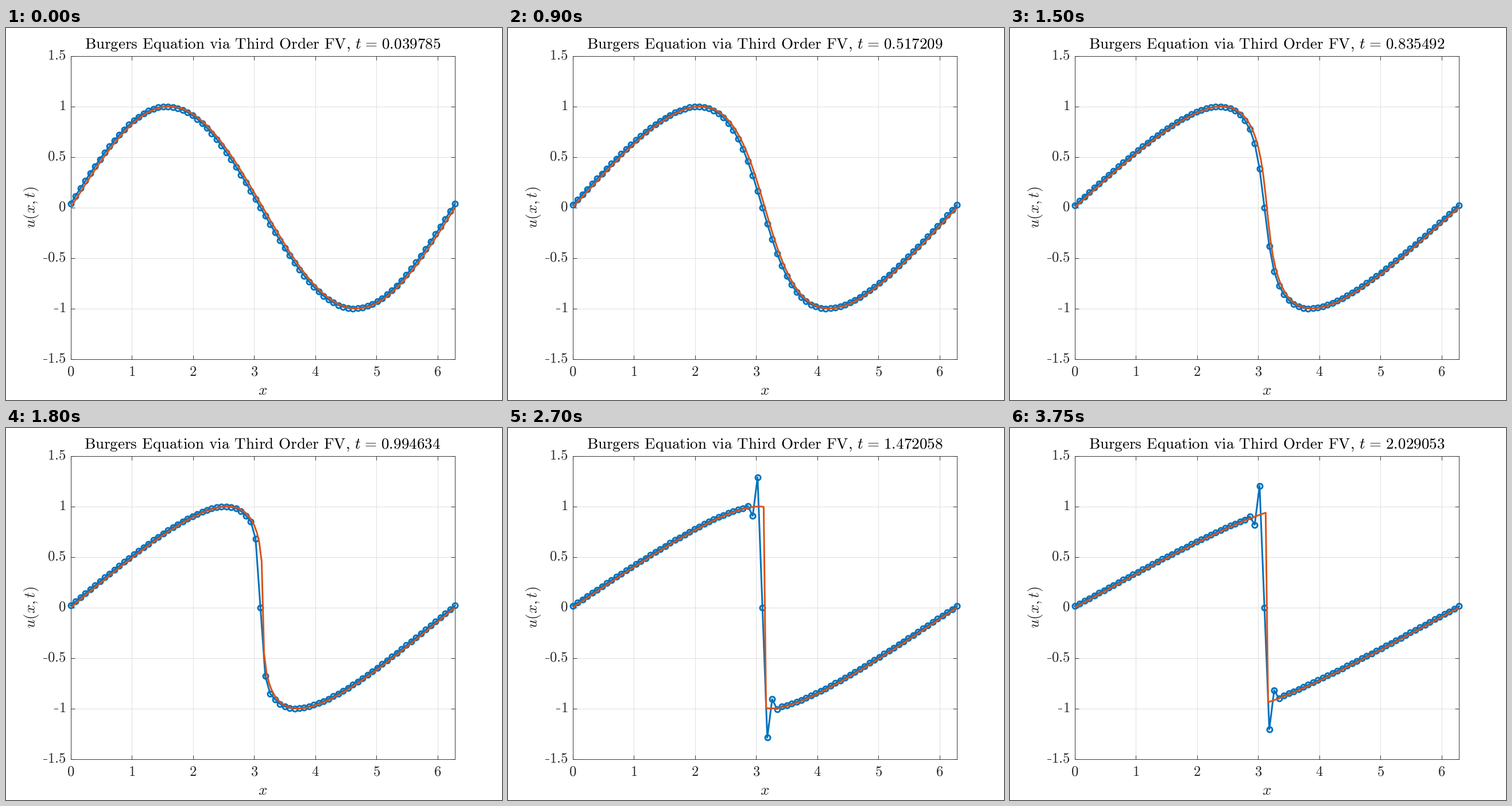
Animation of 864x648 px, one loop 3.9 s. Source, as a matplotlib script:

```python
import numpy as np
import matplotlib.pyplot as plt
from matplotlib.animation import FuncAnimation
from matplotlib.patches import Rectangle

plt.rcParams["mathtext.fontset"] = "cm"

W, H, DPI = 864, 648, 72          # at 72 dpi one point is one pixel
FRAMES, INTERVAL = 26, 150
LEFT, RIGHT, TOP, BOTTOM = 112.7, 782.2, 48.8, 576.55
TITLE_PX, TICK_PX = 27.1, 24.6
LABEL_RIGHT = 104.6
DARK = "#262626"
BLUE, ORANGE = "#0072BD", "#D95319"

# ---- Burgers equation: unlimited third order finite volumes, global LF flux
CELLS = 79
DX = 2 * np.pi / CELLS
edges = np.arange(CELLS + 1) * DX


def rhs(u):
    prev, nxt = np.roll(u, 1), np.roll(u, -1)
    left = (-prev + 5 * u + 2 * nxt) / 6
    right = np.roll((2 * prev + 5 * u - nxt) / 6, -1)
    speed = np.abs(u).max()
    flux = (left**2 + right**2) / 4 - speed * (right - left) / 2
    return -(flux - np.roll(flux, 1)) / DX


def rk3_step(u, dt):
    a = u + dt * rhs(u)
    b = 0.75 * u + 0.25 * (a + dt * rhs(a))
    return u / 3 + 2 / 3 * (b + dt * rhs(b))


def simulate():
    """Return the step size and the state after every second step."""
    u = -np.diff(np.cos(edges)) / DX
    dt = 0.5 * DX / np.abs(u).max()
    states = []
    for step in range(2 * FRAMES - 1):
        u = rk3_step(u, dt)
        if step % 2 == 0:
            states.append(np.append(u, u[0]))
    return dt, states


# ---- Exact solution by characteristics, odd about x = pi
fine_x = np.linspace(0, 2 * np.pi, 160)


def exact(t):
    x = fine_x[:fine_x.size // 2]
    lo = np.zeros_like(x)
    hi = np.full_like(x, np.arccos(-1 / t) if t > 1 else np.pi)
    for _ in range(50):
        mid = (lo + hi) / 2
        below = mid + t * np.sin(mid) < x
        lo, hi = np.where(below, mid, lo), np.where(below, hi, mid)
    u = np.sin(lo)
    return np.concatenate([u, -u[::-1]])


# ---- Stage
fig = plt.figure(figsize=(W / DPI, H / DPI), dpi=DPI, facecolor="white")
ax = fig.add_axes([LEFT / W, 1 - BOTTOM / H, (RIGHT - LEFT) / W, (BOTTOM - TOP) / H])
ax.set_xlim(0, 2 * np.pi)
ax.set_ylim(-1.5, 1.5)
ax.set_xticks(range(7))
ax.set_yticks(np.arange(-1.5, 1.6, 0.5))
ax.set_axisbelow(True)
ax.grid(color="#DFDFDF", linewidth=1)
ax.tick_params(direction="in", length=6.7, width=0.9, color=DARK, top=True,
               right=True, labelbottom=False, labelleft=False)
for spine in ax.spines.values():
    spine.set(color=DARK, linewidth=0.9)


def label(x, y, text, size, color=DARK, ha="center", **kw):
    return fig.text(x / W, 1 - y / H, text, fontsize=size, color=color, ha=ha,
                    va="baseline", **kw)


def roman(text):
    return r"$\mathrm{%s}$" % text


for n in range(7):
    label(LEFT + n * (RIGHT - LEFT) / (2 * np.pi), 606, roman(n), TICK_PX)

for v in np.arange(-1.5, 1.6, 0.5):
    digits = f"{abs(v):g}"
    base = (TOP + BOTTOM) / 2 - v * (BOTTOM - TOP) / 3 + 6
    label(LABEL_RIGHT, base, roman(digits), TICK_PX, ha="right")
    if v < 0:
        # short hyphen in front of the digits
        width = (0.5 if len(digits) == 1 else 1.278) + 0.333
        start = LABEL_RIGHT - (width - 0.011) * TICK_PX
        fig.add_artist(Rectangle((start, H - base + 0.187 * TICK_PX),
                                 0.265 * TICK_PX, 0.058 * TICK_PX,
                                 transform=None, color=DARK, linewidth=0))

label(447.2, 639, "$x$", TITLE_PX)
label(51, 312.7, "$u(x,t)$", TITLE_PX, rotation=90, rotation_mode="anchor")

GAP = r"\hspace{0.379}"
HEAD = GAP.join("Burgers Equation via Third Order FV,".split())
title = label(447, 36, "", TITLE_PX, color="black")

(numeric,) = ax.plot([], [], "-o", color=BLUE, linewidth=3, markersize=9,
                     markerfacecolor="none", markeredgewidth=3,
                     clip_on=False, zorder=3)
(truth,) = ax.plot([], [], color=ORANGE, linewidth=3, zorder=4)

dt, states = simulate()


def draw(k):
    t = (2 * k + 1) * dt
    numeric.set_data(edges, states[k])
    truth.set_data(fine_x, exact(t))
    title.set_text(r"$\mathrm{%s}\hspace{0.18}t\hspace{0.117}=\hspace{0.117}\mathrm{%.6f}$"
                   % (HEAD, t))
    return numeric, truth, title


anim = FuncAnimation(fig, draw, frames=FRAMES, interval=INTERVAL, repeat=True,
                     repeat_delay=0)
plt.show()
```
